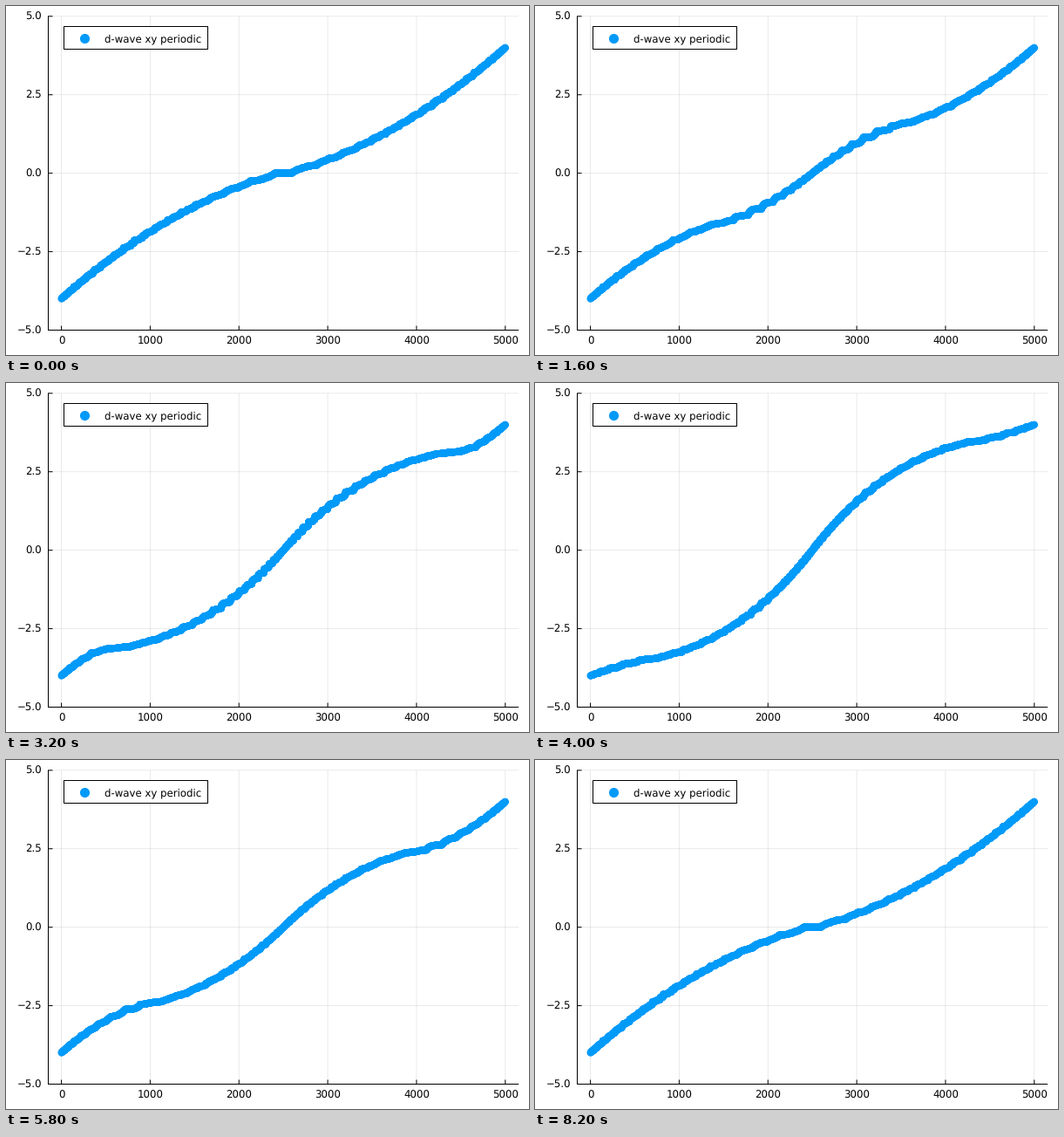
Write a matplotlib script that moves like this. It is 600 px wide and 400 px high and loops after 8.4 s.

```python
import numpy as np
import matplotlib.pyplot as plt
from matplotlib.animation import FuncAnimation
from matplotlib.patches import Rectangle

W, H, DPI = 600, 400, 100
PT = 72 / DPI                      # points per pixel
LEFT, RIGHT, TOP, BOTTOM = 48.5, 588.2, 11.8, 371.5
BLUE = "#009af9"
SIDE = 50                          # lattice sites per side
STEPS = 21                         # gap strengths 0.0, 0.2 ... 4.0

plt.rcParams.update({
    "font.family": "DejaVu Sans",
    "font.size": 11.8 * PT,
    "text.hinting": "none",
})

fig = plt.figure(figsize=(W / DPI, H / DPI), dpi=DPI, facecolor="white")
ax = fig.add_axes([0, 0, 1, 1])
ax.set_xlim(0, W)
ax.set_ylim(H, 0)
ax.axis("off")


def px(n):
    return 63.55 + n * 0.10185


def py(energy):
    return BOTTOM - (energy + 5) * (BOTTOM - TOP) / 10


def line(xs, ys, width=1.0, color="black", alpha=1.0, z=3):
    ax.plot(xs, ys, color=color, lw=width * PT, alpha=alpha, zorder=z,
            solid_capstyle="butt", snap=False)


# Axes, grid and tick labels
for n in range(0, 5001, 1000):
    x = px(n)
    line([x, x], [TOP, BOTTOM], 0.8, alpha=0.1, z=1)
    line([x, x], [BOTTOM, BOTTOM - 5])
    ax.text(x, 387.4, str(n), ha="center", va="baseline")

for value in (-5.0, -2.5, 0.0, 2.5, 5.0):
    y = py(value)
    line([LEFT, RIGHT], [y, y], 0.8, alpha=0.1, z=1)
    line([LEFT, LEFT + 5], [y, y])
    label = f"{value:.1f}".replace("-", "\u2212")
    ax.text(41, y + 4.3, label, ha="right", va="baseline")

line([LEFT, LEFT], [TOP - 0.3, BOTTOM + 0.5])
line([LEFT - 0.5, RIGHT], [BOTTOM, BOTTOM])

# Legend
ax.add_patch(Rectangle((66.5, 23.5), 165, 26, fc="white", ec="black",
                       lw=PT, snap=False, zorder=5))
ax.scatter([90.4], [36.8], s=(11.2 * PT) ** 2, c=BLUE, linewidths=0, zorder=6)
ax.text(113.4, 41, "d-wave xy periodic", va="baseline", zorder=6)

# Spectrum of a periodic square lattice with d_xy pairing
k = 2 * np.pi * np.arange(SIDE) / SIDE
kx, ky = np.meshgrid(k, k)
hopping = 2 * (np.cos(kx) + np.cos(ky))
pairing = np.sin(kx) * np.sin(ky)
count = 2 * SIDE ** 2
xs = px(np.arange(1, count + 1))


def spectrum(gap):
    e = np.hypot(hopping, gap * pairing).ravel()
    return np.sort(np.concatenate([-e, e]))


dots = ax.scatter(xs, py(spectrum(0)), s=np.full(count, (8 * PT) ** 2),
                  c=BLUE, linewidths=0, zorder=4)


def draw(i):
    step = min(i, 2 * STEPS - 1 - i)   # up, then back down
    dots.set_offsets(np.column_stack([xs, py(spectrum(0.2 * step))]))
    return (dots,)


anim = FuncAnimation(fig, draw, frames=2 * STEPS, interval=200,
                     repeat=True, repeat_delay=0, blit=False)
plt.show()
```
